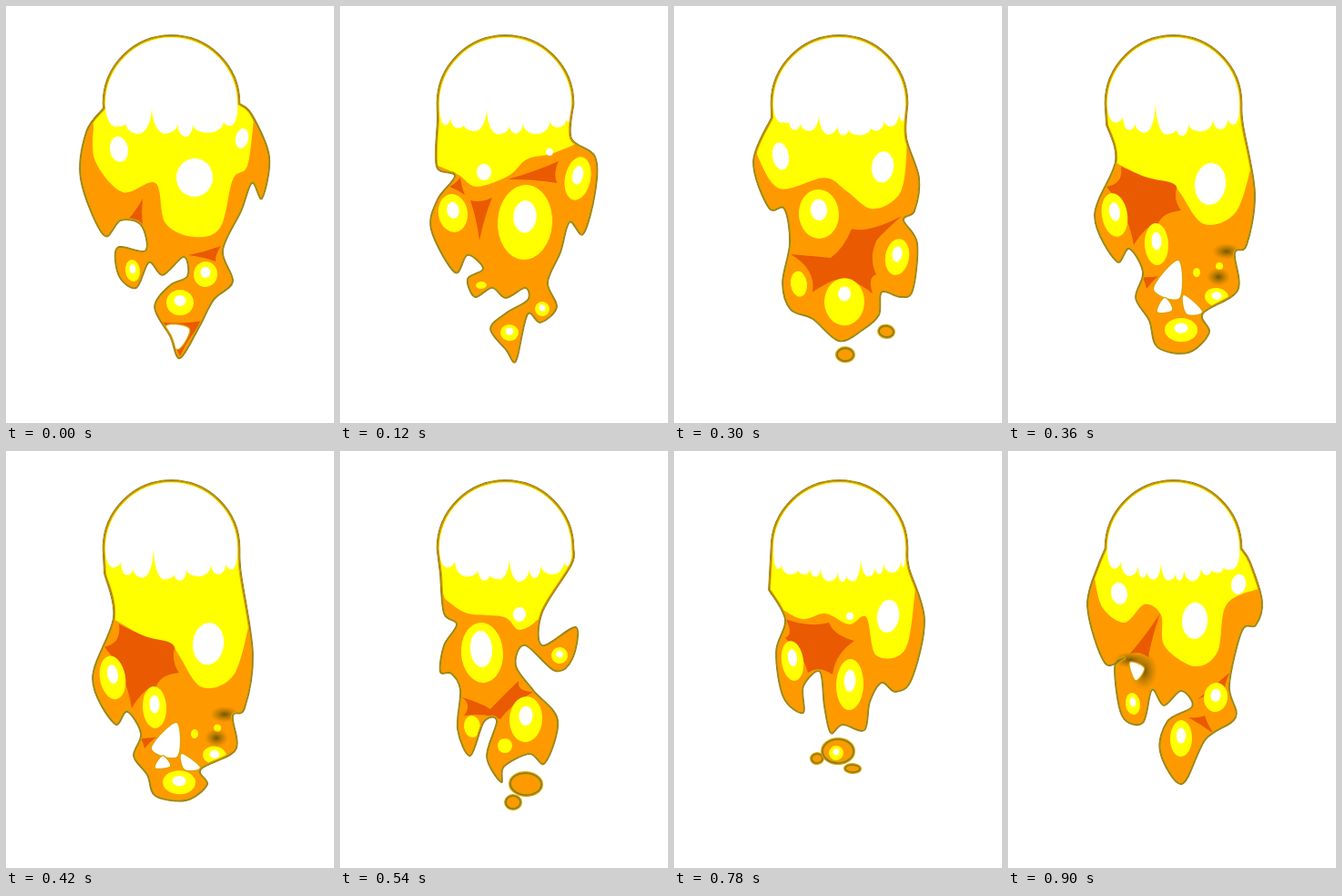
An HTML page with a canvas for the animation above (0.96 s loop, 360x457 px).

```html
<!DOCTYPE html>
<html>
<head>
<meta charset="utf-8">
<style>
  html, body { margin: 0; width: 100%; height: 100%; overflow: hidden; background: #fff; }
  canvas { display: block; }
</style>
</head>
<body>
<canvas id="stage" width="360" height="457"></canvas>
<script>
const ctx = document.getElementById('stage').getContext('2d');
const ORANGE = '#ff9900', YELLOW = '#ffff00', EMBER = '#ea5a00', GOLD = '#dda300', OLIVE = '#8c7a1e';
const HEAD = { x: 181.5, y: 107, r: 75 };
const STEP = 60, STEPS = 16, FALL = 20;
let shift = 0, outline;

// The flame sinks most around its middle and stays put at the head and the tip.
const sink = y => y > 110 && y < 393 ? y + FALL * shift * Math.sin(Math.PI * (y - 110) / 283) : y;

const pairs = nums => nums.flatMap((x, i) => i % 2 ? [] : [[x, sink(nums[i + 1])]]);

function spline(pts, closed) {
  const path = new Path2D(), n = pts.length;
  const at = i => closed ? pts[(i + n) % n] : pts[Math.max(0, Math.min(n - 1, i))];
  path.moveTo(...pts[0]);
  for (let i = 0; i < (closed ? n : n - 1); i++) {
    const [a, b, c, d] = [at(i - 1), at(i), at(i + 1), at(i + 2)];
    path.bezierCurveTo(b[0] + (c[0] - a[0]) / 6, b[1] + (c[1] - a[1]) / 6,
      c[0] - (d[0] - b[0]) / 6, c[1] - (d[1] - b[1]) / 6, ...c);
  }
  return path;
}

function oval(x, y, rx, ry) {
  const path = new Path2D();
  path.ellipse(x, sink(y), rx, ry, (x - HEAD.x) * 0.0026, 0, 2 * Math.PI);
  return path;
}

function fill(path, color) {
  ctx.fillStyle = color;
  ctx.fill(path);
}

function stroke(path, color, width) {
  ctx.strokeStyle = color;
  ctx.lineWidth = width;
  ctx.stroke(path);
}

function rim(path) {
  stroke(path, GOLD, 4);
  stroke(path, OLIVE, 1.6);
}

// Outline from the right neck down and round to the left neck; clips what follows.
function body(...nums) {
  outline = spline([[HEAD.x + HEAD.r, HEAD.y], ...pairs(nums)], false);
  outline.arc(HEAD.x, HEAD.y, HEAD.r, Math.PI, 2 * Math.PI);
  outline.closePath();
  stroke(outline, OLIVE, 1.6);
  fill(outline, ORANGE);
  ctx.clip(outline);
}

function glow(...nums) {
  const path = spline(pairs(nums), false);
  path.lineTo(60, 0);
  path.lineTo(300, 0);
  path.closePath();
  fill(path, YELLOW);
}

// White head whose lower edge hangs in rounded drips between cusps, the tallest at peak.
function drips(peak, gap, tall) {
  const right = HEAD.x + HEAD.r - 2.5, left = HEAD.x - HEAD.r + 2.5;
  const path = new Path2D();
  path.arc(HEAD.x, HEAD.y, HEAD.r - 2.5, Math.PI, 2 * Math.PI);
  const hem = x => 142 - 17 * ((x - HEAD.x) / HEAD.r) ** 2;
  const cusps = [];
  for (let k = Math.floor((right - peak) / gap); peak + k * gap > left + 4; k--) {
    const x = peak + k * gap + Math.sin(k * 2.4) * gap * 0.2;
    if (x < right - 4) cusps.push([x, hem(x) - (k ? 9 + 4 * Math.sin(k * 5 + peak) : tall)]);
  }
  cusps.push([left, 108]);
  let [x0, y0] = [right, 112];
  path.lineTo(x0, y0);
  for (const [x1, y1] of cusps) {
    const mid = (x0 + x1) / 2, low = hem(mid) + 2 * Math.sin(mid), half = (x0 - x1) / 4;
    path.bezierCurveTo(x0, y0 + (low - y0) * 0.6, mid + half, low, mid, low);
    path.bezierCurveTo(mid - half, low, x1, y1 + (low - y1) * 0.6, x1, y1);
    [x0, y0] = [x1, y1];
  }
  path.closePath();
  fill(path, '#fff');
}

// Dark patch with sides bent inwards.
function ember(...nums) {
  const pts = pairs(nums), n = pts.length;
  const center = i => pts.reduce((sum, p) => sum + p[i], 0) / n;
  const cx = center(0), cy = center(1), path = new Path2D();
  path.moveTo(...pts[0]);
  pts.forEach(([x, y], i) => {
    const [nx, ny] = pts[(i + 1) % n];
    path.quadraticCurveTo((x + nx) / 2 * 0.7 + cx * 0.3, (y + ny) / 2 * 0.7 + cy * 0.3, nx, ny);
  });
  fill(path, EMBER);
}

const shine = (x, y, rx, ry) => fill(oval(x, y, rx, ry), '#fff');

function spot(x, y, rx, ry) {
  fill(oval(x, y, rx, ry), YELLOW);
  if (rx > 6) shine(x, y - ry * 0.15, rx * 0.42, ry * 0.43);
}

function drop(x, y, rx, ry) {
  const path = oval(x, y, rx, ry);
  fill(path, ORANGE);
  rim(path);
}

function hole(...nums) {
  const path = spline(pairs(nums), true);
  path.closePath();
  stroke(path, GOLD, 2.5);
  fill(path, '#fff');
}

function smudge(x, y, rx, ry) {
  ctx.save();
  ctx.translate(x, sink(y));
  ctx.scale(rx, ry);
  const soft = ctx.createRadialGradient(0, 0, 0, 0, 0, 1);
  soft.addColorStop(0, 'rgba(90,75,0,0.85)');
  soft.addColorStop(1, 'rgba(140,110,0,0)');
  ctx.fillStyle = soft;
  ctx.fillRect(-1, -1, 2, 2);
  ctx.restore();
}

function broad() {
  body(270, 119, 289, 165, 281, 211, 270, 194, 258, 225, 238, 268, 249, 302, 228, 322, 212, 352,
    191, 386, 180, 362, 163, 330, 180, 306, 199, 296, 195, 275, 172, 295, 157, 281, 143, 309,
    124, 296, 122, 265, 153, 268, 148, 240, 126, 235, 107, 251, 82, 190, 88, 138, 107, 112);
  ember(134, 234, 150, 211, 150, 240);
  ember(200, 273, 236, 263, 230, 280);
  ember(166, 346, 217, 345, 191, 384);
  glow(272, 124, 265, 175, 249, 190, 235, 243, 206, 253, 175, 238, 164, 194, 128, 204, 98, 170, 96, 130);
  drips(160, 25, 31);
  shine(124, 157, 10, 14);
  shine(207, 188, 20, 21);
  shine(259, 145, 7, 11);
  spot(139, 290, 8, 12);
  spot(219, 294, 13, 14);
  spot(191, 325, 15, 14);
  hole(176, 351, 201, 354, 188, 376);
}

function curled() {
  body(254, 145, 280, 165, 280, 205, 267, 250, 252, 237, 242, 270, 228, 303, 238, 330, 220, 347,
    206, 338, 195, 384, 190, 390, 183, 378, 165, 354, 183, 336, 206, 322, 203, 309, 182, 320,
    167, 309, 148, 319, 140, 299, 157, 288, 140, 273, 126, 292, 100, 245, 107, 212, 126, 186,
    106, 176, 107, 125);
  ember(143, 213, 167, 210, 153, 257);
  ember(184, 190, 240, 170, 238, 194);
  ember(120, 198, 132, 188, 137, 207);
  glow(257, 152, 232, 162, 205, 168, 185, 186, 150, 198, 130, 185, 105, 174);
  drips(161, 22, 30);
  spot(124, 227, 16, 21);
  spot(203, 237, 30, 41);
  spot(261, 189, 14, 24);
  spot(155, 306, 6, 4);
  spot(222, 332, 8, 8);
  spot(186, 358, 10, 9);
  shine(158, 182, 8, 9);
  shine(230, 160, 4, 4);
}

function heavy() {
  drop(188, 379, 9, 7);
  drop(233, 347, 8, 6);
  body(255, 138, 269, 175, 264, 207, 252, 216, 267, 240, 262, 294, 248, 302, 228, 296, 225, 325,
    207, 345, 181, 360, 152, 330, 128, 318, 119, 285, 127, 240, 121, 205, 104, 204, 87, 160, 107, 120);
  ember(128, 252, 172, 256, 195, 225, 250, 212, 222, 238, 222, 275, 218, 298, 182, 281, 152, 296);
  glow(256, 140, 249, 188, 218, 205, 190, 188, 165, 175, 115, 185, 89, 150);
  drips(159, 18, 22);
  shine(117, 155, 9, 15);
  shine(229, 165, 12, 17);
  spot(159, 210, 22, 27);
  spot(245, 255, 13, 20);
  fill(oval(137, 286, 9, 14), YELLOW);
  fill(oval(187, 308, 22, 26), YELLOW);
  shine(187, 298, 7, 8);
}

function ringed() {
  body(258, 130, 271, 205, 262, 262, 249, 271, 252, 312, 214, 337, 221, 358, 198, 380, 164, 374,
    155, 345, 140, 320, 148, 292, 133, 266, 119, 280, 95, 230, 118, 170, 108, 130);
  ember(124, 176, 189, 190, 190, 224, 165, 238, 138, 262, 108, 198);
  ember(147, 297, 165, 296, 152, 310);
  glow(268, 172, 250, 226, 215, 239, 189, 205, 180, 194, 150, 187, 115, 170);
  drips(162, 20, 37);
  shine(222, 195, 17, 23);
  spot(117, 229, 14, 24);
  spot(163, 261, 13, 23);
  spot(207, 292, 4, 5);
  spot(232, 285, 4, 4);
  spot(229, 319, 13, 10);
  spot(190, 355, 18, 13);
  smudge(240, 269, 16, 9);
  smudge(231, 297, 13, 10);
  hole(187, 279, 188, 320, 160, 310);
  hole(193, 317, 213, 335, 196, 337);
  hole(172, 320, 180, 333, 164, 335);
}

function winged() {
  drop(190, 385, 8, 7);
  drop(204, 365, 17, 12);
  body(254, 125, 222, 177, 222, 213, 259, 193, 255, 228, 236, 241, 203, 213, 193, 235, 212, 262,
    239, 295, 225, 342, 208, 332, 180, 346, 177, 363, 161, 335, 172, 296, 158, 297, 143, 334,
    129, 305, 132, 262, 122, 244, 110, 242, 114, 213, 128, 190, 114, 178, 110, 135);
  ember(134, 270, 165, 283, 196, 252, 212, 264, 176, 294, 136, 290);
  glow(248, 145, 220, 182, 197, 196, 180, 182, 140, 178, 115, 162);
  drips(186, 19, 27);
  shine(197, 179, 7, 8);
  fill(oval(156, 221, 23, 33), YELLOW);
  shine(155, 217, 12, 20);
  fill(oval(145, 302, 9, 12), YELLOW);
  fill(oval(181, 323, 8, 8), YELLOW);
  spot(204, 294, 18, 25);
  spot(241, 224, 9, 9);
}

function legged() {
  drop(157, 337, 6, 5);
  drop(196, 348, 8, 4);
  drop(180, 329, 17, 13);
  spot(178, 331, 8, 8);
  body(258, 128, 275, 185, 261, 250, 243, 264, 228, 254, 215, 275, 209, 306, 185, 300, 172, 309,
    165, 280, 160, 242, 142, 258, 142, 287, 120, 270, 112, 220, 122, 185, 104, 152);
  ember(122, 184, 170, 188, 198, 208, 174, 245, 147, 243, 122, 205);
  glow(265, 150, 254, 217, 222, 224, 211, 182, 192, 190, 166, 178, 140, 184, 110, 168);
  drips(205, 14, 25);
  shine(235, 181, 12, 18);
  shine(193, 181, 4, 4);
  spot(130, 230, 12, 22);
  spot(193, 256, 15, 28);
}

function gathering() {
  body(266, 122, 279, 165, 272, 191, 257, 197, 243, 257, 250, 292, 217, 316, 191, 365, 167, 330,
    175, 296, 202, 280, 190, 263, 171, 279, 158, 262, 148, 298, 125, 290, 117, 237, 127, 227,
    106, 232, 87, 170, 100, 122);
  ember(134, 222, 167, 178, 154, 226);
  ember(208, 272, 244, 242, 238, 262);
  ember(198, 292, 216, 290, 226, 310);
  glow(278, 150, 240, 168, 230, 220, 205, 236, 172, 214, 168, 180, 150, 168, 128, 188, 104, 172, 95, 140);
  drips(168, 14, 21);
  shine(122, 156, 9, 12);
  shine(253, 146, 8, 11);
  shine(205, 186, 14, 20);
  spot(137, 277, 8, 12);
  spot(228, 270, 13, 16);
  spot(190, 315, 12, 20);
  smudge(149, 241, 15, 21);
  smudge(134, 229, 18, 9);
  hole(134, 232, 149, 238, 140, 251);
}

const poses = [
  { step: 0, draw: broad },
  { step: 2, draw: curled },
  { step: 4, draw: heavy },
  { step: 6, draw: ringed },
  { step: 9, draw: winged },
  { step: 13, draw: legged },
  { step: 15, draw: gathering }
];

function render(step) {
  const away = pose => Math.abs(pose.step - step);
  const pose = poses.reduce((best, p) => away(p) < away(best) ? p : best);
  shift = step - pose.step;
  ctx.fillStyle = '#fff';
  ctx.fillRect(0, 0, 360, 457);
  ctx.save();
  pose.draw();
  rim(outline);
  ctx.restore();
}

const start = performance.now();
let shown = -1;

function tick() {
  const step = Math.floor((performance.now() - start) / STEP) % STEPS;
  if (step !== shown) render(shown = step);
  requestAnimationFrame(tick);
}
tick();
</script>
</body>
</html>
```
